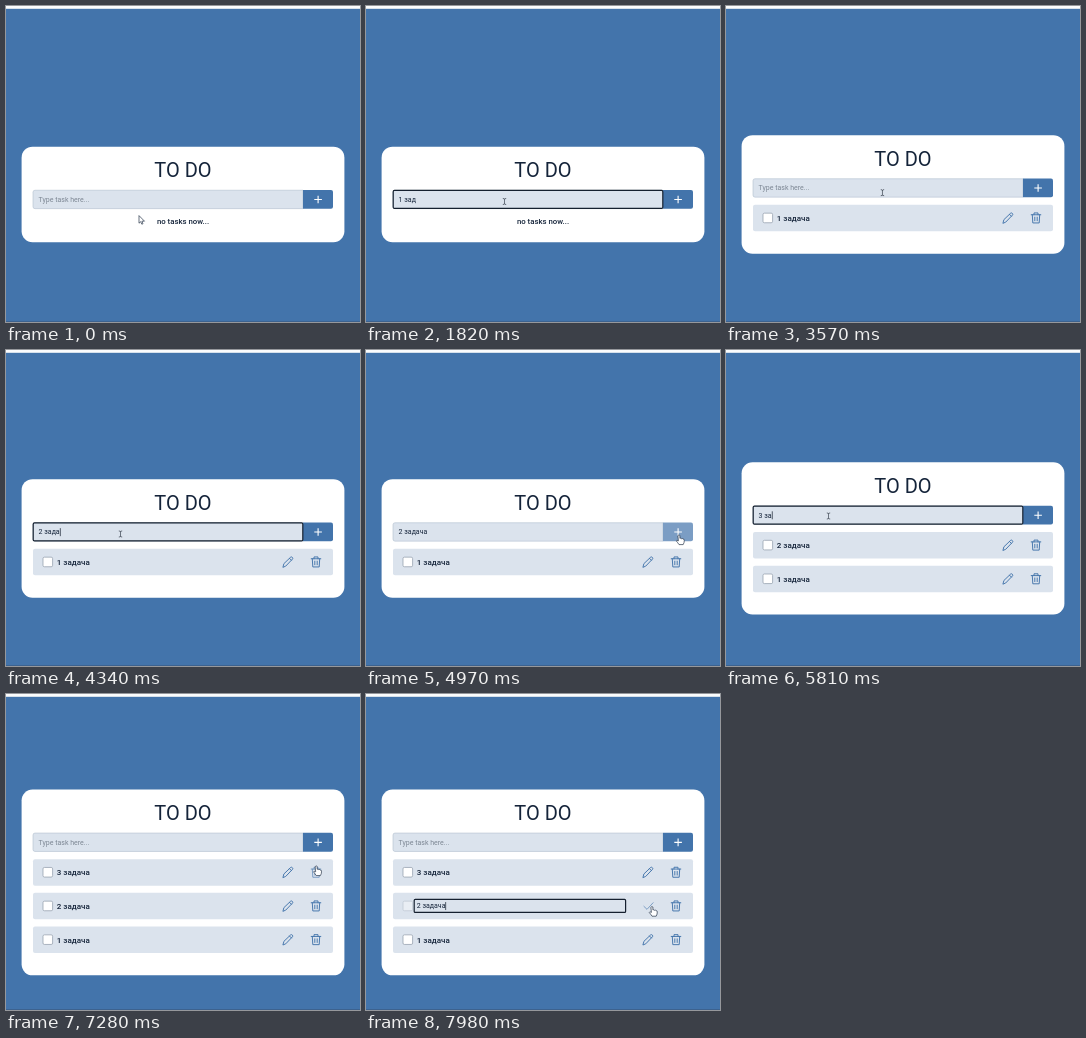
Write an HTML page that moves like this. It is 354 px wide and 316 px high and loops after 8 s.

```html
<!DOCTYPE html>
<html lang="en">
<head>
<meta charset="utf-8">
<title>To do</title>
<style>
  html, body { margin: 0; width: 100%; height: 100%; overflow: hidden; background: #4374ab; }
  svg { display: block; width: 100vw; height: 100vh; }
  text { font-family: Roboto, "Noto Sans", sans-serif; fill: #15243a; white-space: pre; }
  .small { font-size: 7px; }
  .label { font-size: 8px; font-weight: 500; }
  .icon { fill: none; stroke: #4374ab; stroke-width: .95; stroke-linecap: round; stroke-linejoin: round; }
  .cursor { stroke-linejoin: round; stroke-linecap: round; }
</style>
</head>
<body>
<svg viewBox="0 0 354 316">
  <defs>
    <g id="pencil" class="icon">
      <path d="M-5 5 L-4.1 1.7 L2.7 -4.8 Q3.5 -5.4 4.4 -4.5 Q5.2 -3.6 4.5 -2.9 L-2 3.9 Z M1.5 -3.6 L3.4 -1.7"/>
    </g>
    <g id="trash" class="icon">
      <path d="M-4.8 -3.2 H4.8 M-2 -3.2 V-5 H2 V-3.2 M-3.7 -3.2 L-3.2 5 H3.2 L3.7 -3.2 M-1.2 -.8 V2.8 M1.2 -.8 V2.8"/>
    </g>
    <g id="check" class="icon"><path d="M-4.6 .4 L-1.5 3.4 L4.6 -3.2"/></g>
  </defs>
  <rect width="354" height="316" fill="#4374ab"/>
  <rect width="354" height="2.8" fill="#fbfcfd"/>
  <rect y="315" width="354" height="1" fill="#3c628f"/>
  <rect id="card" x="15.6" width="322.8" rx="11" fill="#fff"/>
  <g id="head">
    <text x="177" y="30.6" font-size="20" text-anchor="middle">TO DO</text>
    <path d="M297 43.6 H29 Q27 43.6 27 45.6 V60 Q27 62 29 62 H297 Z" fill="#dbe3ed" stroke="#b3bfcf" stroke-width=".6"/>
    <path id="button" d="M297 43.4 H325 Q327 43.4 327 45.4 V60.2 Q327 62.2 325 62.2 H297 Z"/>
    <path d="M308.3 52.9 H315.9 M312.1 49.1 V56.7" stroke="#fff" stroke-width="1.1"/>
    <rect id="ring" x="27.2" y="43.8" width="269.6" height="18" rx="1.2" fill="none" stroke="#15202f" stroke-width="1.2"/>
    <text id="hint" class="small" x="32.6" y="55.3" style="fill:#7d8794">Type task here...</text>
    <text id="typed" class="small" x="32.6" y="55.3"></text>
    <rect id="caret" y="49" width=".7" height="8" fill="#15202f"/>
    <text id="empty" class="label" x="177" y="77.4" text-anchor="middle" style="font-size:7.8px">no tasks now...</text>
  </g>
  <g id="rows"></g>
  <g class="cursor">
    <path id="arrow" d="M0 0 V7.2 L1.7 5.7 L2.8 8.2 L4 7.7 L2.9 5.2 H5.1 Z" fill="#fff" stroke="#27364a" stroke-width=".7"/>
    <path id="beam" d="M-1.3 -3 Q0 -3 0 -2.3 Q0 -3 1.3 -3 M0 -2.3 V2.3 M-1.3 3 Q0 3 0 2.3 Q0 3 1.3 3" fill="none" stroke="#3a4350" stroke-width=".7"/>
    <path id="hand" d="M-.9 .4 Q0 -.7 .9 .4 V3.3 Q2 2.8 2.5 3.7 Q3.6 3.2 4 4.1 Q5.3 3.9 5.3 5.2 Q5.4 7.6 4.2 9.6 H0 Q-1.3 7.6 -2.7 5.9 Q-2.6 4.6 -.9 5.6 Z" fill="#fff" stroke="#27364a" stroke-width=".7"/>
  </g>
</svg>
<script>
const LOOP = 8000, WORD = " задача";
const $ = id => document.getElementById(id);
const show = (el, on) => el.setAttribute("display", on ? "inline" : "none");
const place = (el, x, y) => el.setAttribute("transform", `translate(${x} ${y})`);

// Each round: click into the field, key times, leave the field, add the task
const rounds = [
  { focus: 420, keys: [980, 1050, 1120, 1190, 1260, 2240, 2380, 2520], blur: 3180, add: 3290 },
  { focus: 3710, keys: [3860, 3930, 4000, 4080, 4200, 4270, 4410, 4480], blur: 4970, add: 5040 },
  { focus: 5400, keys: [5530, 5600, 5670, 5740, 5880, 5950, 6090, 6160], blur: 7040, add: 7110 }
];
const EDIT = 7600;

// Pointer moves: start, end, x, y
const moves = [
  [70, 350, 138.5, 195.5],
  [2800, 3080, 312.6, 196.6],
  [3360, 3660, 114.5, 184],
  [4550, 4900, 313, 185],
  [5080, 5390, 102.5, 166],
  [6370, 6860, 313.5, 167.3],
  [7210, 7560, 283, 211],
  [7700, 7910, 286, 212.6]
];

const ease = p => p * p * (3 - 2 * p);
function pointer(t) {
  let x = 133, y = 210;
  for (const [a, b, tx, ty] of moves) {
    const p = ease(Math.min(1, Math.max(0, (t - a) / (b - a))));
    x += (tx - x) * p;
    y += (ty - y) * p;
  }
  return { x, y };
}

const rows = rounds.map((_, i) => {
  const g = document.createElementNS("http://www.w3.org/2000/svg", "g");
  g.innerHTML = `
    <rect x="27" width="300" height="26.5" rx="2" fill="#dbe3ed"/>
    <rect class="box" x="37" y="8.3" width="9.6" height="9.6" rx="1.4" fill="#fff" stroke="#8d98a6" stroke-width=".7"/>
    <text class="label name" x="50.8" y="16.2">${i + 1 + WORD}</text>
    <g class="editor">
      <rect x="48.2" y="6.6" width="211.4" height="13" rx="1" fill="#dbe3ed" stroke="#15202f" stroke-width="1.2"/>
      <text class="small" x="50.8" y="15.6">${i + 1 + WORD}</text>
      <rect class="mark" x="79.4" y="9.2" width=".7" height="8" fill="#15202f"/>
    </g>
    <use class="pen" href="#pencil" x="282" y="13.1"/>
    <use class="ok" href="#check" x="282.5" y="13.1"/>
    <use class="bin" href="#trash" x="310" y="13.1"/>`;
  $("rows").append(g);
  return g;
});

const blink = (t, since) => Math.floor((t - since) / 500) % 2 === 0;
const near = (p, x, y) => Math.abs(p.x - x) < 7 && Math.abs(p.y - y) < 8;

function render(t) {
  const count = rounds.filter(r => t >= r.add).length;
  const height = count ? 118.5 + 33.7 * (count - 1) : 95.5;
  const top = 188.4 - height / 2;
  const p = pointer(t);
  $("card").setAttribute("y", top);
  $("card").setAttribute("height", height);
  place($("head"), 0, top);
  show($("empty"), !count);

  const round = rounds[count];
  const keys = round ? round.keys.filter(k => t >= k) : [];
  const focused = !!round && t >= round.focus && t < round.blur;
  const typed = $("typed");
  typed.textContent = (count + 1 + WORD).slice(0, keys.length);
  show($("hint"), !keys.length);
  show($("ring"), focused);
  show($("caret"), focused && blink(t, keys.length ? keys[keys.length - 1] : round.focus));
  $("caret").setAttribute("x", 32.8 + (keys.length ? typed.getComputedTextLength() : 0));

  const inHead = p.y > top + 43.6 && p.y < top + 62;
  const overButton = inHead && p.x > 297 && p.x < 327;
  const overField = inHead && p.x > 27 && p.x <= 297;
  $("button").setAttribute("fill", overButton ? "#7b9dc4" : "#4374ab");

  let overIcon = false, overEditor = false;
  rows.forEach((g, i) => {
    show(g, i < count);
    if (i >= count) return;
    const y = top + 69.7 + 33.7 * (count - 1 - i);
    const part = name => g.querySelector("." + name);
    const editing = i === 1 && t >= EDIT;
    const onPen = near(p, 282, y + 13), onBin = near(p, 310, y + 13);
    overIcon = overIcon || onPen || onBin;
    overEditor = overEditor || editing && p.x > 48 && p.x < 260 && Math.abs(p.y - y - 13) < 7;
    place(g, 0, y);
    part("box").setAttribute("opacity", editing ? .4 : 1);
    show(part("name"), !editing);
    show(part("editor"), editing);
    show(part("mark"), blink(t, EDIT));
    show(part("pen"), !editing);
    show(part("ok"), editing);
    for (const n of ["pen", "ok"]) part(n).setAttribute("opacity", onPen ? .65 : 1);
    part("bin").setAttribute("opacity", onBin ? .65 : 1);
  });

  const kind = overButton || overIcon ? "hand" : overField || overEditor ? "beam" : "arrow";
  for (const id of ["arrow", "beam", "hand"]) {
    show($(id), id === kind);
    place($(id), p.x, p.y);
  }
}

const start = performance.now();
function tick() {
  render((performance.now() - start) % LOOP);
  requestAnimationFrame(tick);
}
tick();
</script>
</body>
</html>
```
